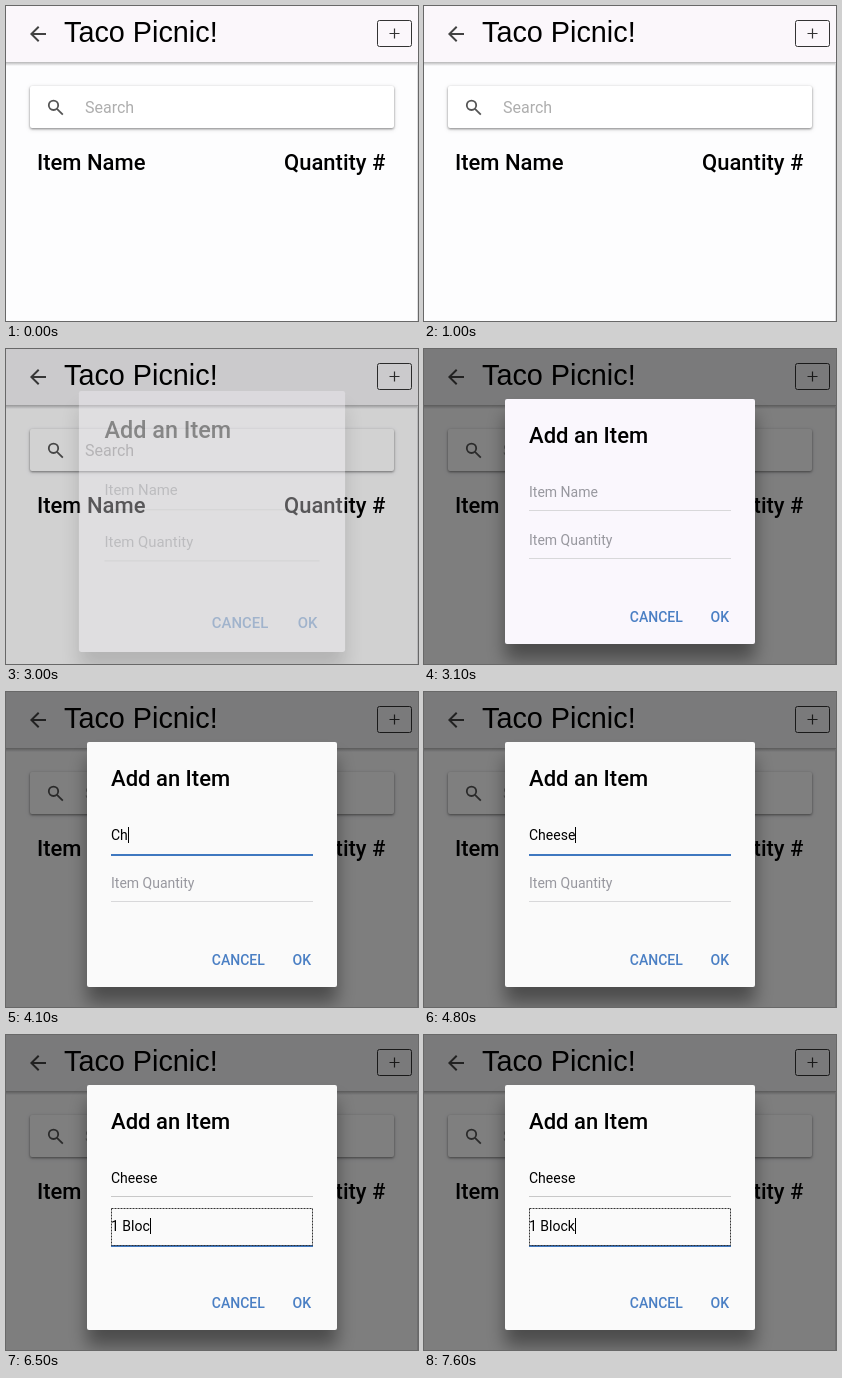
Animation of 412x315 px, one loop 8 s. Source, as an HTML page:

```html
<!DOCTYPE html>
<html lang="en">
<head>
<meta charset="utf-8">
<title>Shopping list</title>
<style>
  html, body { margin: 0; width: 100%; height: 100%; overflow: hidden; }
  svg { display: block; width: 412px; height: 315px; font: 14px Roboto, sans-serif; }
  text { white-space: pre; }
  .title { font: 28.8px "Liberation Sans", Arial, sans-serif; }
  .heading { font-size: 22px; font-weight: 500; }
  .search { font-size: 16px; fill: #aeaeae; }
  .button { font-weight: 500; fill: #4a7fc4; text-anchor: end; }
  .card { filter: drop-shadow(0 1px 1px rgba(0, 0, 0, .4)) drop-shadow(0 1px 2px rgba(0, 0, 0, .14)); }
  .shadow { filter: blur(9px); fill: #000; opacity: .4; }
  .outline { fill: none; stroke: #333; stroke-dasharray: 2 1; }
</style>
</head>
<body>
<svg viewBox="0 0 412 315">
  <defs>
    <linearGradient id="fade" x2="0" y2="1">
      <stop stop-opacity=".28"/>
      <stop offset="1" stop-opacity="0"/>
    </linearGradient>
  </defs>

  <rect width="412" height="315" fill="#fdfdfe"/>
  <rect id="header" width="412" height="56"/>
  <rect y="56" width="412" height="4" fill="url(#fade)"/>
  <rect x="411" y="57" width="1" height="258" fill="#dedee0"/>
  <path transform="translate(20 16)" fill="#424242"
    d="M20 11H7.8l5.6-5.6L12 4l-8 8 8 8 1.4-1.4L7.8 13H20z"/>
  <text class="title" x="58" y="36">Taco Picnic!</text>
  <g fill="none" stroke="#333">
    <rect x="371.5" y="14.5" width="34" height="26" rx="2"/>
    <path d="M383.5 27.5h10M388.5 22.5v10" stroke-width="1.2"/>
  </g>

  <rect class="card" x="24" y="80" width="364" height="42" rx="2" fill="#fff"/>
  <g fill="none" stroke="#555" stroke-width="1.8">
    <circle cx="47.5" cy="99.3" r="4.7"/>
    <path d="M51 102.8l5.8 5.8"/>
  </g>
  <text class="search" x="79" y="106.5">Search</text>
  <text class="heading" x="31" y="164">Item Name</text>
  <text class="heading" x="278" y="164">Quantity #</text>

  <rect id="backdrop" width="412" height="315"/>
  <g id="dialog">
    <rect class="shadow" x="81" y="66" width="250" height="245"/>
    <rect id="panel" x="81" y="50" width="250" height="245" rx="2"/>
    <text class="heading" x="105" y="94">Add an Item</text>
    <g id="fields"></g>
    <text class="button" x="258.8" y="272.5">CANCEL</text>
    <text class="button" x="305" y="272.5">OK</text>
  </g>
</svg>
<script>
const LOOP = 8000, OPEN = 2900, BLINK = 500;
const byId = id => document.getElementById(id);

function add(parent, tag, attrs) {
  const node = document.createElementNS('http://www.w3.org/2000/svg', tag);
  set(node, attrs);
  return parent.appendChild(node);
}

function set(node, attrs) {
  for (const key in attrs) node.setAttribute(key, attrs[key]);
}

// Each field takes focus, then gains one character at every time in keys.
function makeField(y, options) {
  const group = add(byId('fields'), 'g', { transform: `translate(105 ${y})` });
  return {
    ...options,
    label: add(group, 'text', { y: 23 }),
    line: add(group, 'rect', { width: 202 }),
    outline: add(group, 'rect', { class: 'outline', x: .5, y: .5, width: 201, height: 37 }),
    caret: add(group, 'rect', { y: 10, width: 1, height: 16 })
  };
}

const fields = [
  makeField(125, { hint: 'Item Name', value: 'Cheese', focus: 3700, blur: 5100,
    keys: [3900, 4100, 4200, 4400, 4600, 4800] }),
  makeField(173, { hint: 'Item Quantity', value: '1 Block', focus: 5100, blur: LOOP, tabbed: true,
    keys: [5500, 5700, 6000, 6200, 6400, 6500, 6600] })
];

function drawField(field, t) {
  const pressed = field.keys.filter(time => time <= t);
  const typed = field.value.slice(0, pressed.length);
  const focused = t >= field.focus && t < field.blur;
  const lastInput = pressed.at(-1) ?? field.focus;
  const caretOn = focused && Math.floor((t - lastInput) / BLINK) % 2 === 0;

  field.label.textContent = typed || field.hint;
  set(field.label, { fill: typed ? '#000' : '#98989f' });
  set(field.line, focused
    ? { y: 37, height: 2, fill: '#3f78c0' }
    : { y: 36, height: 1, fill: typed ? '#c8c8c8' : '#d8d8da' });
  set(field.outline, { visibility: focused && field.tabbed ? 'visible' : 'hidden' });
  set(field.caret, {
    x: typed ? Math.round(field.label.getComputedTextLength()) : 0,
    visibility: caretOn ? 'visible' : 'hidden'
  });
}

function draw(now) {
  const t = Math.floor(now % LOOP / 100) * 100;
  const shown = Math.min(1, Math.max(0, (t - OPEN) / 200)) ** 1.5;
  const scale = 1.1 - .1 * shown;

  set(byId('header'), { fill: t < OPEN ? '#fbf7fb' : '#f6f5f7' });
  set(byId('backdrop'), { opacity: shown / 2 });
  set(byId('panel'), { fill: t < OPEN + 300 ? '#faf7fd' : '#fafafa' });
  set(byId('dialog'), {
    opacity: shown,
    transform: `translate(206 172.5) scale(${scale}) translate(-206 -172.5)`
  });
  fields.forEach(field => drawField(field, t));
}

const start = performance.now();
function tick() {
  draw(performance.now() - start);
  requestAnimationFrame(tick);
}
tick();
</script>
</body>
</html>
```
